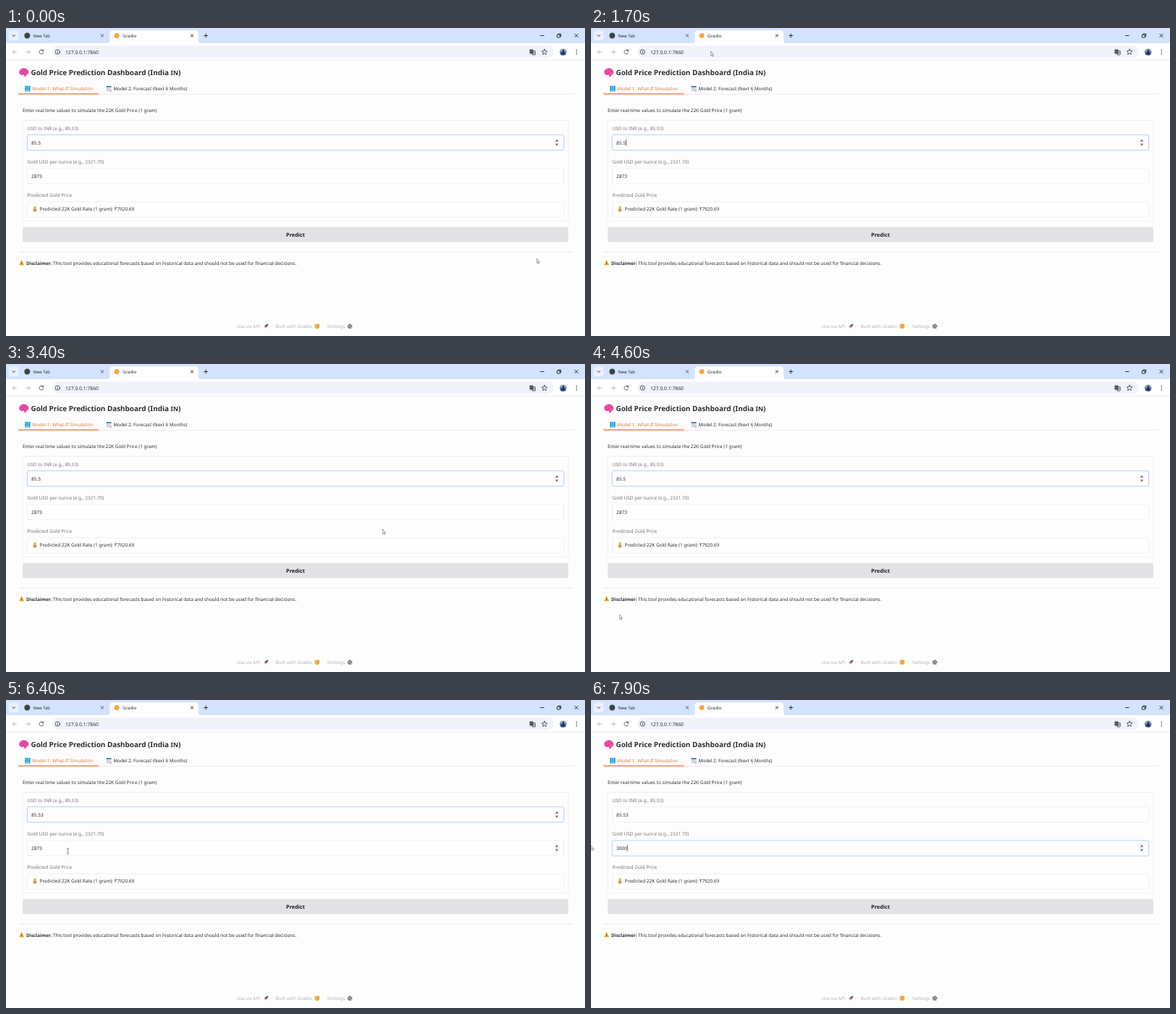
Animation of 800 by 425 pixels, one loop 8000 ms. Source, as an HTML page:

```html
<!DOCTYPE html>
<html lang="en">
<head>
<meta charset="utf-8">
<title>Gold Price Prediction Dashboard</title>
<style>
html, body { margin: 0; width: 100%; height: 100%; overflow: hidden; background: #fefdfe; }
svg { display: block; width: 800px; height: 425px; }
text { font: 6.44px "Noto Sans", "Open Sans", sans-serif; fill: #2b2b30; text-rendering: geometricPrecision; white-space: pre; }
.bold { font-weight: 700; }
.title { font-size: 9.9px; }
.label { font-size: 6.5px; fill: #74747c; }
.value { font-size: 6.5px; }
.foot { fill: #b2b2b7; }
.line { fill: none; stroke: #4a4d52; stroke-width: .9; stroke-linecap: round; stroke-linejoin: round; }
.dark { stroke: #222; }
.pale { stroke: #b0b2b7; }
.edge { fill: none; stroke: #ebeaee; stroke-width: .8; }
.field { fill: #fefefe; stroke: #ecebef; stroke-width: .8; }
.glow { fill: none; stroke: #e9f2fc; stroke-width: 2.6; }
.ring { fill: #fefefe; stroke: #c2d9f0; stroke-width: 1; }
.spin { fill: #7c7c80; }

/* One 8 s clock: 1.25% is 100 ms */
.t { animation: 8s step-end infinite; }
.till58 { animation-name: till58; }
.from58 { animation-name: from58; }
.till65 { animation-name: till65; }
.from65 { animation-name: from65; }
.from64 { animation-name: from64; }
.till70 { animation-name: till70; }
.select { animation-name: select; }
.blink { animation-name: blink; }
.beam { animation-name: beam; }
.arrow { animation-name: arrow; }
.type { animation-name: type; }
.key1 { animation-name: key1; }
.key2 { animation-name: key2; }
.key3 { animation-name: key3; }
.key4 { animation-name: key4; }
.invert { animation-name: invert; }
.pointer { animation: move 8s linear infinite; }

@keyframes till58 { 0% { opacity: 1 } 72.5%, 100% { opacity: 0 } }
@keyframes from58 { 0% { opacity: 0 } 72.5%, 100% { opacity: 1 } }
@keyframes till65 { 0% { opacity: 1 } 81.25%, 100% { opacity: 0 } }
@keyframes from65 { 0% { opacity: 0 } 81.25%, 100% { opacity: 1 } }
@keyframes from64 { 0% { opacity: 0 } 80%, 100% { opacity: 1 } }
@keyframes till70 { 0% { opacity: 1 } 87.5%, 100% { opacity: 0 } }
@keyframes select { 0% { opacity: 0 } 81.25% { opacity: 1 } 87.5%, 100% { opacity: 0 } }
@keyframes invert { 0% { fill: #2b2b30 } 81.25%, 100% { fill: #e4eefc } }
@keyframes key1 { 0% { fill-opacity: 0 } 87.5%, 100% { fill-opacity: 1 } }
@keyframes key2 { 0% { fill-opacity: 0 } 90%, 100% { fill-opacity: 1 } }
@keyframes key3 { 0% { fill-opacity: 0 } 91.25%, 100% { fill-opacity: 1 } }
@keyframes key4 { 0% { fill-opacity: 0 } 92.5%, 100% { fill-opacity: 1 } }
@keyframes blink {
  0%, 11.25%, 25%, 38.75%, 51.25%, 65% { opacity: 0; transform: none }
  5%, 17.5%, 31.25%, 45%, 58.75% { opacity: 1; transform: none }
  72.5% { opacity: 1; transform: translateX(3.7px) }
  76.25%, 100% { opacity: 0; transform: translateX(3.7px) }
}
@keyframes type {
  0% { opacity: 0; transform: none }
  87.5% { opacity: 1; transform: none }
  90% { opacity: 1; transform: translateX(3.7px) }
  91.25% { opacity: 1; transform: translateX(7.4px) }
  92.5%, 100% { opacity: 1; transform: translateX(11.1px) }
}
@keyframes beam { 0% { opacity: 0 } 66.25% { opacity: 1 } 82.5%, 100% { opacity: 0 } }
@keyframes arrow { 0% { opacity: 1 } 66.25% { opacity: 0 } 82.5%, 100% { opacity: 1 } }
@keyframes move {
  0% { transform: translate(733px, 318px) }
  17.5% { transform: translate(733px, 318px); animation-timing-function: steps(4, start) }
  22.5% { transform: translate(165px, 32px) }
  25% { transform: translate(165px, 32px); animation-timing-function: steps(4, start) }
  30% { transform: translate(200px, 108px) }
  31.25% { transform: translate(200px, 108px); animation-timing-function: steps(5, start) }
  37.5% { transform: translate(540px, 180px) }
  42.5% { transform: translate(540px, 180px); animation-timing-function: steps(4, start) }
  47.5% { transform: translate(460px, 372px) }
  50% { transform: translate(460px, 372px); animation-timing-function: steps(3, start) }
  53.75% { transform: translate(30px, 360px) }
  57.5% { transform: translate(30px, 360px); animation-timing-function: steps(3, start) }
  61.25% { transform: translate(57px, 316.5px) }
  65% { transform: translate(57px, 316.5px); animation-timing-function: steps(2, start) }
  67.5% { transform: translate(60px, 162px) }
  78.75% { transform: translate(60px, 162px); animation-timing-function: steps(2, start) }
  81.25% { transform: translate(85.5px, 208.5px); animation-timing-function: steps(2, start) }
  83.75%, 100% { transform: translate(-.5px, 200.5px) }
}
</style>
</head>
<body>
<svg viewBox="0 0 800 425">
  <defs>
    <linearGradient id="sky" x2="0" y2="1">
      <stop offset="0" stop-color="#b4c8ee"/><stop offset=".5" stop-color="#6a82bd"/><stop offset="1" stop-color="#27345c"/>
    </linearGradient>
    <path id="cross" d="M-1.8-1.8 1.8 1.8M1.8-1.8-1.8 1.8"/>
    <path id="spin" class="spin" d="M-2.3-1.3 0-4.8 2.3-1.3zM-2.3 1.5 0 4.9 2.3 1.5z"/>
    <g id="focus">
      <rect class="glow" x="29.5" y="0" width="741" height="21" rx="2"/>
      <rect class="ring" x="29.5" y="0" width="741" height="21" rx="2"/>
    </g>
  </defs>

  <rect width="800" height="425" fill="#fefdfe"/>

  <!-- browser frame -->
  <rect width="800" height="21" fill="#d3e3fd"/>
  <rect x="3.5" y="3.5" width="14" height="14" rx="4" fill="#e9f1fe"/>
  <path class="line dark" d="M8.8 9.7 10.7 11.6 12.6 9.7"/>
  <circle cx="29.3" cy="10.5" r="3.9" fill="#3d4249"/>
  <text x="37.5" y="12.9" style="font-size:5.85px">New Tab</text>
  <use class="line" href="#cross" x="133" y="10.5"/>
  <path d="M139.5 21Q143.5 21 143.5 17V8Q143.5 3.5 148 3.5H261.5Q266 3.5 266 8V17Q266 21 270 21Z" fill="#fff"/>
  <circle cx="153" cy="10.5" r="3.5" fill="#f5a742"/>
  <text x="161" y="12.9" style="font-size:6.1px">Gradio</text>
  <use class="line dark" href="#cross" x="257" y="10.5"/>
  <path class="line dark" d="M273.6 10.5H278.8M276.2 7.9V13.1"/>
  <path class="line dark" d="M738.5 10.5H743.2"/>
  <path class="line dark" d="M761.8 9.3H765.4V13H761.8ZM763 9.1V8H766.7V11.8H765.6"/>
  <path class="line dark" d="M785.7 8.2 790.3 12.8M790.3 8.2 785.7 12.8"/>

  <rect y="21" width="800" height="23" fill="#fff"/>
  <rect x="64" y="24.5" width="693" height="17" rx="8.5" fill="#f0f4fa"/>
  <path class="line pale" d="M14.3 33H9.3M11.6 30.6 9.2 33 11.6 35.4"/>
  <path class="line pale" d="M28 33H33M30.7 30.6 33.1 33 30.7 35.4"/>
  <path class="line" d="M51.3 31.2A2.9 2.9 0 1 0 51.8 33.7M51.7 29.7V31.7H49.6"/>
  <circle class="line" cx="71.2" cy="33" r="3.2"/>
  <path class="line" d="M71.2 32.8V34.7M71.2 31.3V31.4"/>
  <text x="82" y="35.6" style="font-size:6.77px">127.0.0.1:7860</text>
  <rect x="723.5" y="29.5" width="5" height="6" rx=".6" fill="#55595f"/>
  <rect class="line" x="727" y="31.5" width="4.3" height="5.5" rx=".5"/>
  <path class="line" d="M728 33.5H730.5M730 33.5 728.2 35.8M728.2 34.2 730.2 35.8" style="stroke-width:.5"/>
  <path class="line" d="M744 29.2 745.1 31.8 747.8 32 745.7 33.8 746.4 36.5 744 35 741.6 36.5 742.3 33.8 740.2 32 742.9 31.8Z"/>
  <circle cx="769.7" cy="33" r="4.8" fill="url(#sky)"/>
  <path d="M767 36.5Q767.4 33 769 32.4 768.4 29.6 770 29.6 771.6 29.6 771 32.4 772.4 33 772.6 36.5Z" fill="#27345c"/>
  <g fill="#4a4d52"><circle cx="788.3" cy="30.4" r=".8"/><circle cx="788.3" cy="33" r=".8"/><circle cx="788.3" cy="35.6" r=".8"/></g>
  <path d="M0 44.2H800" stroke="#e3e5ea" stroke-width=".8"/>

  <!-- heading -->
  <path d="M18.2 62Q17.6 58.5 20.5 56.8 23.5 54.3 27 55.7 30.5 56.7 31.2 60.5 31.7 64 28.6 64.5L27.6 67.2 25.6 67 24.8 64.6Q19.5 66 18.2 62Z" fill="#ee4fa6"/>
  <path d="M20.2 61Q22 58.8 24 60.6M23.5 57.2Q26 56.8 26.2 59.2M21.5 63.3Q24 61.7 26 63.4M27.5 58.5Q30 59.5 28.8 62" fill="none" stroke="#bf2f80" stroke-width=".8"/>
  <text class="bold title" x="34.5" y="65.1">Gold Price Prediction Dashboard (India</text>
  <text class="bold" x="227.6" y="65.1" style="font-size:8.6px">IN</text>
  <text class="bold title" x="238" y="65.1">)</text>

  <!-- tabs -->
  <path d="M17 91.3H784" stroke="#e8e7eb" stroke-width=".8"/>
  <path d="M17 90.9H128.5" stroke="#e9773f" stroke-width="1.4"/>
  <rect x="26" y="79.7" width="7.8" height="7.8" rx="1.2" fill="#35a7dc"/>
  <g class="bold">
    <text x="27.6" y="83.2" style="font-size:3.6px;fill:#fff">12</text>
    <text x="27.6" y="86.7" style="font-size:3.6px;fill:#fff">34</text>
  </g>
  <text x="36.2" y="85.9" style="fill:#e8743b">Model 1: What-If Simulation</text>
  <path d="M138.5 80H145.5V87.5H138.5Z" fill="#dfe7f0"/>
  <path d="M138.5 80H145.5V82H138.5Z" fill="#5b83b5"/>
  <path d="M139.5 83.6H144.5M139.5 85.5H144.5" stroke="#8ba5c3" stroke-width=".8" stroke-dasharray="1 .6"/>
  <path d="M143.5 87.5 145.5 85.5V87.5Z" fill="#d9534f"/>
  <text x="148.5" y="85.9" style="font-size:6.38px">Model 2: Forecast (Next 6 Months)</text>

  <!-- form -->
  <text x="23" y="115.6">Enter real-time values to simulate the 22K Gold Price (1 gram)</text>
  <rect class="edge" x="23" y="127.5" width="754" height="138.5" rx="2"/>
  <text class="label" x="29.5" y="140.8">USD to INR (e.g., 85.53)</text>
  <text class="label" x="29.5" y="186.8">Gold USD per ounce (e.g., 2321.70)</text>
  <text class="label" x="29.5" y="232.9">Predicted Gold Price</text>

  <rect class="field" x="29.5" y="147.5" width="741" height="21" rx="2"/>
  <rect class="field" x="29.5" y="194" width="741" height="21" rx="2"/>
  <rect class="field" x="29.5" y="240" width="741" height="21" rx="2"/>

  <g class="t till65"><use href="#focus" y="147.5"/><use href="#spin" x="761" y="158"/></g>
  <g class="t from65"><use href="#focus" y="194"/></g>
  <use class="t from64" href="#spin" x="761" y="204.2"/>

  <text class="value t till58" x="35" y="160.5">85.5</text>
  <text class="value t from58" x="35" y="160.5">85.53</text>
  <rect class="t blink" x="48" y="153.6" width=".7" height="9" fill="#333"/>

  <rect class="t select" x="35" y="199" width="15" height="11" fill="#3267b5"/>
  <g class="t till70"><text class="value t invert" x="35" y="206.6">2873</text></g>
  <text class="value" x="35" y="206.6"><tspan class="t key1">3</tspan><tspan class="t key2">0</tspan><tspan class="t key3">0</tspan><tspan class="t key4">0</tspan></text>
  <rect class="t type" x="38.8" y="199.8" width=".7" height="9" fill="#333"/>

  <path d="M38.9 248.3Q36.6 250.5 37 252.5 37.4 253.5 40 253.5 42.6 253.5 43 252.5 43.4 250.5 41.1 248.3L41.8 246.3H38.2Z" fill="#e8b66a"/>
  <path d="M38.8 248.3H41.2" stroke="#a06c35" stroke-width=".7"/>
  <text class="bold" x="38.8" y="252.6" style="font-size:4px;fill:#94692f">$</text>
  <text x="46.5" y="252.3">Predicted 22K Gold Rate (1 gram): ₹7920.69</text>

  <rect x="23" y="274.5" width="754" height="21" rx="3" fill="#e2e2e5"/>
  <text class="bold" x="400" y="287.7" text-anchor="middle" style="font-size:7.3px;fill:#1c1c20">Predict</text>

  <path d="M17 309.2H784" stroke="#e6e5ea" stroke-width=".8"/>
  <path d="M21.6 320.8 24.8 326.9H18.4Z" fill="#f9b520" stroke="#f9b520" stroke-width=".7" stroke-linejoin="round"/>
  <path d="M21.6 322.6V324.9M21.6 325.7V326.4" stroke="#3b2f16" stroke-width=".9"/>
  <text class="bold" x="28" y="326.5" style="font-size:6.36px">Disclaimer:</text>
  <text x="65" y="326.5" style="font-size:6.46px">This tool provides educational forecasts based on historical data and should not be used for financial decisions.</text>

  <!-- footer -->
  <text class="foot" x="318.7" y="414" style="font-size:6.25px">Use via API</text>
  <path d="M362.3 408.3Q359.2 408.3 357.6 411.2L359.3 413Q362.4 411.3 362.3 408.3Z" fill="#59606c"/>
  <path d="M358.2 410.2 356.2 411.4 357.6 412.2M360 412.4 359.3 414.4 358.3 413.1" fill="#c9483b"/>
  <path d="M357.4 412.2 356 414.4 358.3 413.2Z" fill="#f2a33a"/>
  <text class="foot" x="366.3" y="414">·</text>
  <text class="foot" x="372.5" y="414">Built with Gradio</text>
  <circle cx="430" cy="411.5" r="3.4" fill="#f5a742"/>
  <text class="foot" x="438" y="414">·</text>
  <text class="foot" x="444" y="414">Settings</text>
  <circle cx="475" cy="411.6" r="2.9" fill="none" stroke="#66696f" stroke-width="1.2" stroke-dasharray="1.3 .978"/>
  <circle cx="475" cy="411.6" r="2" fill="#b8babf" stroke="#5c6066" stroke-width="1"/>
  <circle cx="475" cy="411.6" r=".7" fill="#5c6066"/>

  <!-- mouse pointer -->
  <g class="pointer">
    <path class="t arrow" d="M.3 0V6.4L1.6 5.2 2.6 7.3 3.5 6.9 2.6 4.8H4.5Z" fill="#fff" stroke="#55555a" stroke-width=".6" stroke-linejoin="round"/>
    <path class="t beam" d="M-1.5-3.5H1.5M0-3.5V3.5M-1.5 3.5H1.5" fill="none" stroke="#444" stroke-width=".7"/>
  </g>
</svg>
</body>
</html>
```
